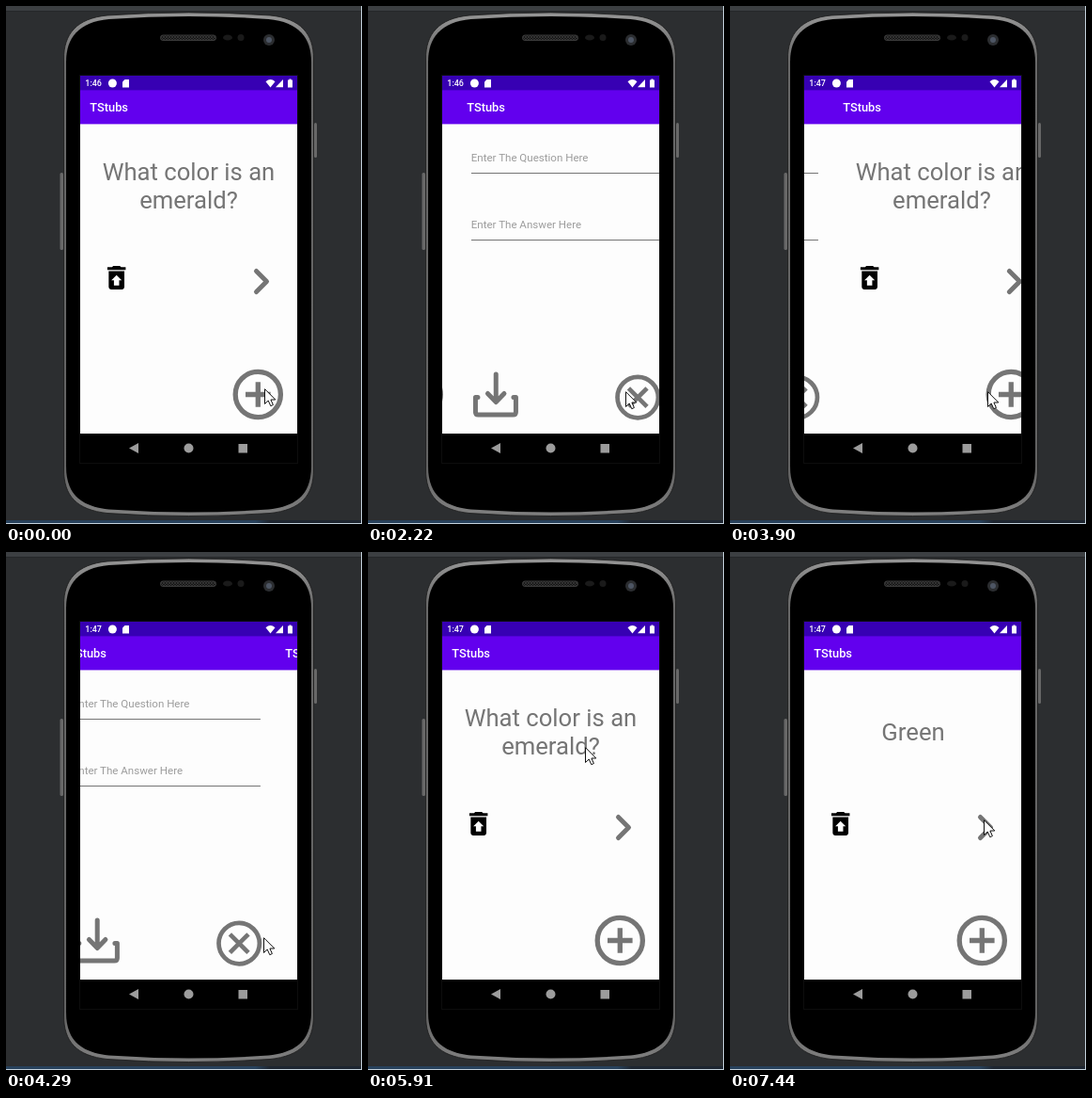
Recreate the animation shown at these times as an HTML page. Size 379 by 550 pixels, loop 8000 ms.

```html
<!DOCTYPE html>
<html lang="en">
<head>
<meta charset="utf-8">
<title>Flash cards</title>
<style>
  html, body { margin: 0; width: 100%; height: 100%; overflow: hidden; background: #2c2e30; }
  svg { display: block; }
  text { font-family: Roboto, "Noto Sans", sans-serif; }
  .title { font-size: 12.83px; font-weight: 500; fill: #fff; }
  .card { font-size: 25.67px; fill: #757575; text-anchor: middle; }
  .hint { font-size: 11.55px; fill: #9c9c9c; }
  .line { fill: none; stroke: #757575; }
</style>
</head>
<body>
<svg width="379" height="550" viewBox="0 0 379 550">
  <defs>
    <linearGradient id="rim" x1="0" y1="0" x2="0" y2="1">
      <stop offset="0" stop-color="#969696"/>
      <stop offset=".1" stop-color="#686868"/>
      <stop offset=".9" stop-color="#626262"/>
      <stop offset="1" stop-color="#808080"/>
    </linearGradient>
    <linearGradient id="dock">
      <stop offset=".7" stop-color="#27415c"/>
      <stop offset=".74" stop-color="#1d2530"/>
    </linearGradient>
    <pattern id="mesh" width="3" height="3" patternUnits="userSpaceOnUse">
      <rect width="3" height="3" fill="#161616"/>
      <path d="M0 0L3 3M3 0L0 3" stroke="#3c3c3c" stroke-width=".7"/>
    </pattern>
    <path id="body" d="M61.500 56C61.500 30 75 13 108 10Q194.500 4 281 10C314 13 327.500 30 327.500 56V492C327.500 520 314 535 281 538.500Q194.500 544.500 108 538.500C75 535 61.500 520 61.500 492Z"/>
    <clipPath id="screen"><rect x="79" y="89" width="231" height="365"/></clipPath>
    <clipPath id="reveal"><circle id="hole" cx="194.5" cy="190.5"/></clipPath>
  </defs>

  <!-- desktop -->
  <rect width="379" height="550" fill="#2c2e30"/>
  <rect width="379" height="5" fill="#3c3f42"/>
  <rect y="5" width="379" height="1" fill="#252729"/>
  <rect y="546" width="379" height="3" fill="url(#dock)"/>
  <path d="M378 0h1V550H0V549H378Z" fill="#c4d2dc"/>

  <!-- phone -->
  <rect x="57.500" y="177" width="3.500" height="82" rx="1.500" fill="#686868"/>
  <rect x="328" y="124" width="3" height="37" rx="1.500" fill="#686868"/>
  <use href="#body" fill="url(#rim)" stroke="#1b1b1b" stroke-width=".8"/>
  <use href="#body" transform="translate(194.500 274.250) scale(.981 .985) translate(-194.500 -274.250)"/>
  <rect x="164.500" y="31" width="59" height="5.500" rx="2.500" fill="url(#mesh)" stroke="#3a3a3a"/>
  <ellipse cx="236" cy="33.500" rx="5" ry="3" fill="#1a1a1a"/>
  <circle cx="250" cy="33.500" r="3.500" fill="#1a1a1a"/>
  <circle cx="280" cy="36" r="6" fill="#2b2d30"/>
  <circle cx="280" cy="36" r="3" fill="#4d5563"/>
  <rect x="78.500" y="73.500" width="232" height="412" fill="none" stroke="#0d0d0d"/>

  <!-- status bar -->
  <rect x="79" y="74" width="231" height="16" fill="#3700b3"/>
  <g fill="#fff">
    <text id="clock" x="84.300" y="85.300" font-size="8.98" font-weight="500"></text>
    <circle cx="113.400" cy="82" r="4.500"/>
    <path d="M126.500 78H131V86.500H124V80.500Z"/>
    <path d="M276.500 80.200Q281.500 76 286.500 80.200L281.500 86.500Z"/>
    <path d="M295 78V86.300H287Z"/>
    <path d="M300 78.500H301.500V77.500H303.500V78.500H305V86.500H300Z"/>
  </g>

  <!-- app -->
  <rect x="79" y="89.400" width="231" height="37" fill="#6200ee"/>
  <rect x="79" y="125.400" width="231" height="328.600" fill="#fdfdfd"/>
  <g clip-path="url(#screen)">
    <g id="home">
      <text class="title" x="89.300" y="112">TStubs</text>
      <g id="question" class="card">
        <text x="194.500" y="185">What color is an</text>
        <text x="194.500" y="215">emerald?</text>
      </g>
      <text class="card" x="195" y="200" clip-path="url(#reveal)">Green</text>
      <path transform="translate(101 271.800) scale(1.390)" fill="#000"
            d="M19 4h-3.500l-1-1h-5l-1 1H5v2h14zM6 7v12c0 1.100.9 2 2 2h8c1.100 0 2-.9 2-2V7zm8 7v4h-4v-4H8l4-4 4 4z"/>
      <path class="line" stroke-width="5" stroke-linecap="round" stroke-linejoin="round" d="M266.500 281.500L277.500 292.500L266.500 303.500"/>
      <g class="line" stroke-width="5.300">
        <circle cx="268.300" cy="412.500" r="24.100"/>
        <path d="M255 412.500h26.600M268.300 399.200v26.600"/>
      </g>
    </g>
    <g id="form">
      <text class="title" x="89.300" y="112">TStubs</text>
      <text class="hint" x="93.800" y="165">Enter The Question Here</text>
      <text class="hint" x="93.800" y="235.700">Enter The Answer Here</text>
      <path class="line" d="M94 177.500H294M94 248.500H294"/>
      <g class="line" stroke-width="5" stroke-linecap="round" stroke-linejoin="round">
        <path d="M120.300 391V420M111.500 411.500L120.300 420.500L129 411.500"/>
        <path d="M101 415.500H98.500V431Q98.500 434 101.500 434H138.500Q141.500 434 141.500 431V415.500H139"/>
      </g>
      <g class="line" stroke-width="4.700">
        <circle cx="271.300" cy="415.600" r="21.700"/>
        <path d="M261.500 405.800l19.600 19.600M281.100 405.800l-19.600 19.600"/>
      </g>
    </g>
  </g>

  <!-- navigation bar -->
  <g fill="#9c9c9c">
    <path d="M131 469.500L141 464V475Z"/>
    <circle cx="194.500" cy="469.500" r="5"/>
    <rect x="247.500" y="465" width="9.500" height="9.500"/>
  </g>

  <path id="cursor" d="M.5 .7V16.500L4.200 13L6.800 18.700L9.400 17.500L6.900 12H11.800Z" fill="#fff" stroke="#111" stroke-width="1"/>
</svg>

<script>
  const LOOP = 8000, WIDTH = 231;
  const OPEN = 1800, MINUTE = 2520, CLOSE = 3900, FLIP = 6210, SHOWN = 6640;

  // key points of the pointer's path: time, x, y
  const path = [
    [0, 275, 406], [170, 274, 409], [4440, 274, 409], [4880, 274, 284],
    [5030, 259, 234], [5175, 255, 224], [5760, 250, 219], [5910, 231, 207],
    [6400, 231, 207], [7170, 270, 259], [7380, 270, 284]
  ];

  const [home, form, cursor, question, hole, clock] =
    ["home", "form", "cursor", "question", "hole", "clock"].map(id => document.getElementById(id));

  const clamp = v => Math.min(1, Math.max(0, v));
  const move = (node, x, y = 0) => node.setAttribute("transform", `translate(${x} ${y})`);

  // the screen refreshes in coarse steps
  const sample = t => Math.floor((t - 30) / 147) * 147 + 30;

  // linear slide in four visible steps; 0 before it, 1 after it
  function slide(t, start, step, first, last) {
    const n = Math.floor((t - start) / step);
    return n < 0 ? 0 : n > 3 ? 1 : first + (last - first) * n / 3;
  }

  function pointerAt(t) {
    const i = path.findIndex(k => k[0] > t);
    if (i < 1) return path.at(i).slice(1);
    const [t0, x0, y0] = path[i - 1], [t1, x1, y1] = path[i];
    const p = (t - t0) / (t1 - t0);
    return [x0 + (x1 - x0) * p, y0 + (y1 - y0) * p].map(Math.round);
  }

  function draw(t) {
    const opened = slide(t, OPEN, 140, .069, .931);
    const closed = slide(t, CLOSE, 130, .134, .9);
    // closing pushes both pages to the right, then snaps home
    const shift = closed === 1 ? 0 : closed > 0 ? closed : -opened;
    move(home, shift * WIDTH);
    move(form, (shift > 0 ? shift - 1 : shift + 1) * WIDTH);

    const s = sample(t);
    move(cursor, ...pointerAt(s));
    question.setAttribute("visibility", t < FLIP ? "visible" : "hidden");
    hole.setAttribute("r", 40 * clamp((s - FLIP) / (SHOWN - FLIP)) ** 3);
    clock.textContent = t < MINUTE ? "1:46" : "1:47";
  }

  const start = performance.now();
  function tick() {
    draw((performance.now() - start) % LOOP);
    requestAnimationFrame(tick);
  }
  tick();
</script>
</body>
</html>
```
